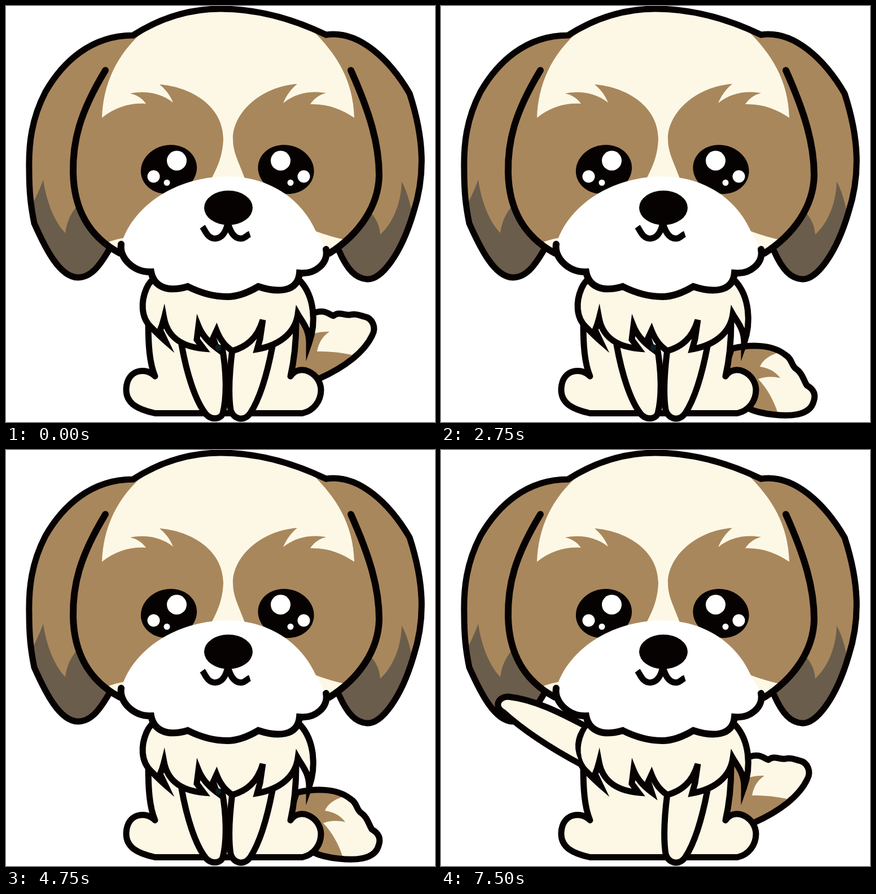
Animation of 760 by 737 pixels, one loop 7.75 s. Source, as an HTML page with a canvas:

```html
<!DOCTYPE html>
<html lang="en">
<head>
<meta charset="utf-8">
<title>Puppy</title>
<style>
html, body { margin: 0; width: 100%; height: 100%; overflow: hidden; background: #fff; }
canvas { display: block; }
</style>
</head>
<body>
<canvas id="stage" width="760" height="737"></canvas>
<script>
const ctx = document.getElementById('stage').getContext('2d');
const INK = '#070202', BROWN = '#a9875c', CREAM = '#fdf8e6', GREY = '#6a5d4b', WHITE = '#fff';
const STEP = 250, STEPS = 31;
const P = d => new Path2D(d);

const tailUp = {
  shape: P('M515,560 L548,543 C565,538 570,545 580,549 C590,540 600,549 610,547 C622,544 628,549 634,550 C650,553 656,570 649,583 C635,613 600,640 555,660 L510,650'),
  line: P('M540,544 L548,543 C565,538 570,545 580,549 C590,540 600,549 610,547 C622,544 628,549 634,550 C650,553 656,570 649,583 C635,613 600,640 555,660'),
  patch: P('M516,553 L530,572 L535,585 Q550,576 573,577 Q555,589 551,612 Q580,611 613,618 Q590,642 557,660 L510,655 Z')
};
const tailDown = {
  shape: P('M515,607 C545,600 585,598 610,618 C622,625 620,635 628,642 C640,650 642,662 648,672 C662,680 664,690 660,701 C653,727 615,727 590,724 C570,722 555,718 545,713 L500,650 Z'),
  patch: P('M515,607 C545,600 575,600 598,614 Q572,622 565,639 Q588,642 601,659 Q580,654 562,661 Q585,685 597,722 L548,715 L500,650 Z')
};
tailDown.line = tailDown.shape;

const torso = P('M252,560 C252,600 254,632 264,656 C250,640 215,642 213,678 C212,705 235,715 264,721.5 L525,721.5 C545,717 558,700 558,680 C557,650 520,632 504,656 C510,630 514,600 514,560');
const legLeft = P('M311,600 C320,650 335,700 355,724 C365,734 380,732 384,722 C392,690 390,645 383,605');
const legRight = P('M401,608 C395,655 394,690 398,716 C404,734 423,736 433,721 C450,695 463,650 472,603');
const ruff = P('M270,479 C259,482 252,493 249,500 C239,523 238,552 258,570 C265,577 274,586 282,593 L273,574 Q277,565 280,553 C285,580 304,603 350,607 L338,591 L341,567 C347,582 358,595 373,606 L367,588 L373,575 C380,593 390,604 401,611 C425,604 445,590 455,556 L450,590 L445,608 C490,600 513,575 517,546 C525,560 537,572 537,597 C550,560 546,515 522,488 Q513,479 500,478');

const head = P('M225,52 C275,20 325,5 380,5 C450,5 515,26 567,51 C625,42 680,95 715,155 C741,235 743,300 722,365 C700,440 665,485 640,484 C620,483 605,468 590,434 L183,431 C165,462 150,481 127,481 C95,480 70,430 50,385 C44,355 41,330 41,290 C40,245 45,200 70,152 C100,100 150,52 225,52 Z');
const headLine = P('M590,434 C605,468 620,483 640,484 C665,485 700,440 722,365 C743,300 741,235 715,155 C680,95 625,42 567,51 C515,26 450,5 380,5 C325,5 275,20 225,52 C150,52 100,100 70,152 C45,200 40,245 41,290 C41,330 44,355 50,385 C70,430 95,480 127,481 C150,481 165,462 183,431');
const earTips = P('M40,362 Q54,340 66,308 C72,350 88,385 105,402 Q109,371 130,350 L200,440 L120,500 L40,400 Z M640,360 Q661,378 663,405 C685,385 700,350 701,311 Q714,335 720,372 L700,480 L640,500 L580,430 Z');
const face = P('M176,114 C130,190 118,240 119,295 C120,350 140,405 202,438 L573,438 C625,405 660,355 661,300 C661,245 645,190 611,114 Z');
const faceLines = P('M176,114 C130,190 118,240 119,295 C120,350 140,405 202,438 M573,438 C625,405 660,355 661,300 C661,245 645,190 611,114');
const blaze = P('M246,43 C195,85 172,140 170,198 C195,178 222,171 248,173 C240,162 230,157 220,155 C243,150 272,152 296,171 C290,157 282,147 272,139 C320,142 384,172 385,235 C384,265 375,285 363,308 L424,308 C412,275 402,260 402,235 C402,190 450,143 516,138 C505,147 497,158 491,172 C515,153 540,150 567,154 C553,158 545,165 539,174 C570,173 595,183 617,198 C615,130 585,85 543,43 Q380,-30 246,43 Z');
const jowls = P('M177,420 Q193,413 214,410 L205,438 Z M546,398 Q575,409 604,415 L572,438 L548,430 Z');

const chinCurve = 'C572,455 548,476 520,473 C517,508 480,508 447,497 C425,510 408,515 392,515 C365,515 342,507 322,497 C285,508 262,497 257,471 C225,472 200,445 204,422';
const muzzle = P('M204,422 L208,411 C235,345 310,302 392,302 C470,302 525,345 549,399 L567,431 ' + chinCurve);
const chin = P('M567,431 ' + chinCurve);
const mouth = P('M348,391 C353,398 357,412 371,412 C384,411 390,399 393,384 C397,399 403,412 416,412 C424,412 426,406 432,404');

const armEdge = 'C205,534 150,500 111,465 C93,455 101,437 119,437 C165,442 210,465 252,487';
const arm = P('M248,557 ' + armEdge + ' Q226,520 248,557 Z');
const armLine = P('M248,557 ' + armEdge);

// Head poses: turn in degrees and where the middle of the brow lands.
const POSES = {
  straight: [0, 393.5, 114],
  left: [-18.6, 303.5, 134.5],
  right: [15.9, 457, 128.5]
};

// Each gesture is made twice, then rests for one tail wag.
const GESTURES = ['none', 'blink', 'left', 'left', 'right', 'wave'];

function fill(path, color) {
  ctx.fillStyle = color;
  ctx.fill(path);
}

function stroke(path, width = 11, cap = 'round', join = 'round') {
  ctx.strokeStyle = INK;
  ctx.lineWidth = width;
  ctx.lineCap = cap;
  ctx.lineJoin = join;
  ctx.stroke(path);
}

function oval(x, y, rx, ry, color, turn = 0) {
  ctx.fillStyle = color;
  ctx.beginPath();
  ctx.ellipse(x, y, rx, ry, turn, 0, Math.PI * 2);
  ctx.fill();
}

function drawTail(tail) {
  fill(tail.shape, CREAM);
  fill(tail.patch, BROWN);
  stroke(tail.line);
}

function drawBody(pawUp) {
  fill(torso, CREAM);
  stroke(torso);
  for (const leg of pawUp ? [legRight] : [legLeft, legRight]) {
    fill(leg, CREAM);
    stroke(leg);
  }
  fill(ruff, CREAM);
  stroke(ruff, 11, 'round', 'miter');
  if (!pawUp) oval(376, 605, 5, 6, '#0b1d26');
}

function drawEye(x, shineX, side) {
  oval(x, 289.5, 50, 43, INK, -side * 0.25);
  oval(shineX + side * 14, 274, 17.5, 17.5, WHITE);
  oval(shineX - side * 27, 302, 11, 11, WHITE);
  oval(shineX - side * 3.5, 313, 5.5, 5.5, WHITE);
}

function drawEyes(squint) {
  ctx.save();
  ctx.translate(0, 333);
  ctx.scale(1, squint ? 0.69 : 1);
  ctx.translate(0, -333);
  drawEye(288.5, 288.5, 1);
  drawEye(496, 500.5, -1);
  ctx.restore();
}

function drawHead([turn, x, y], squint) {
  ctx.save();
  ctx.translate(x, y);
  ctx.rotate(turn * Math.PI / 180);
  ctx.translate(-393.5, -114);

  fill(head, BROWN);
  ctx.save();
  ctx.clip(head);
  fill(earTips, GREY);
  fill(face, BROWN);
  fill(blaze, CREAM);
  ctx.restore();
  fill(jowls, CREAM);

  drawEyes(squint);
  stroke(headLine, 11, 'round', 'miter');
  stroke(faceLines, 12);
  fill(muzzle, WHITE);
  stroke(chin, 12, 'round', 'miter');
  oval(394, 357.5, 43, 30.5, INK);
  stroke(mouth, 11, 'butt', 'miter');
  ctx.restore();
}

function gestureAt(step) {
  const beat = step + 2;
  return beat % 6 < 4 ? GESTURES[Math.floor(beat / 6)] : 'none';
}

function draw(step) {
  const wagDown = step % 2 === 1;
  const gesture = gestureAt(step);
  const squint = wagDown && gesture === 'blink';
  const pawUp = !wagDown && gesture === 'wave';
  const pose = !wagDown && POSES[gesture] || POSES.straight;

  ctx.fillStyle = WHITE;
  ctx.fillRect(0, 0, 760, 737);
  drawTail(wagDown ? tailDown : tailUp);
  drawBody(pawUp);
  drawHead(pose, squint);
  if (pawUp) {
    fill(arm, CREAM);
    stroke(armLine);
  }
}

const start = performance.now();
function tick() {
  const elapsed = Math.max(0, performance.now() - start);
  draw(Math.floor(elapsed / STEP) % STEPS);
  requestAnimationFrame(tick);
}
tick();
</script>
</body>
</html>
```
